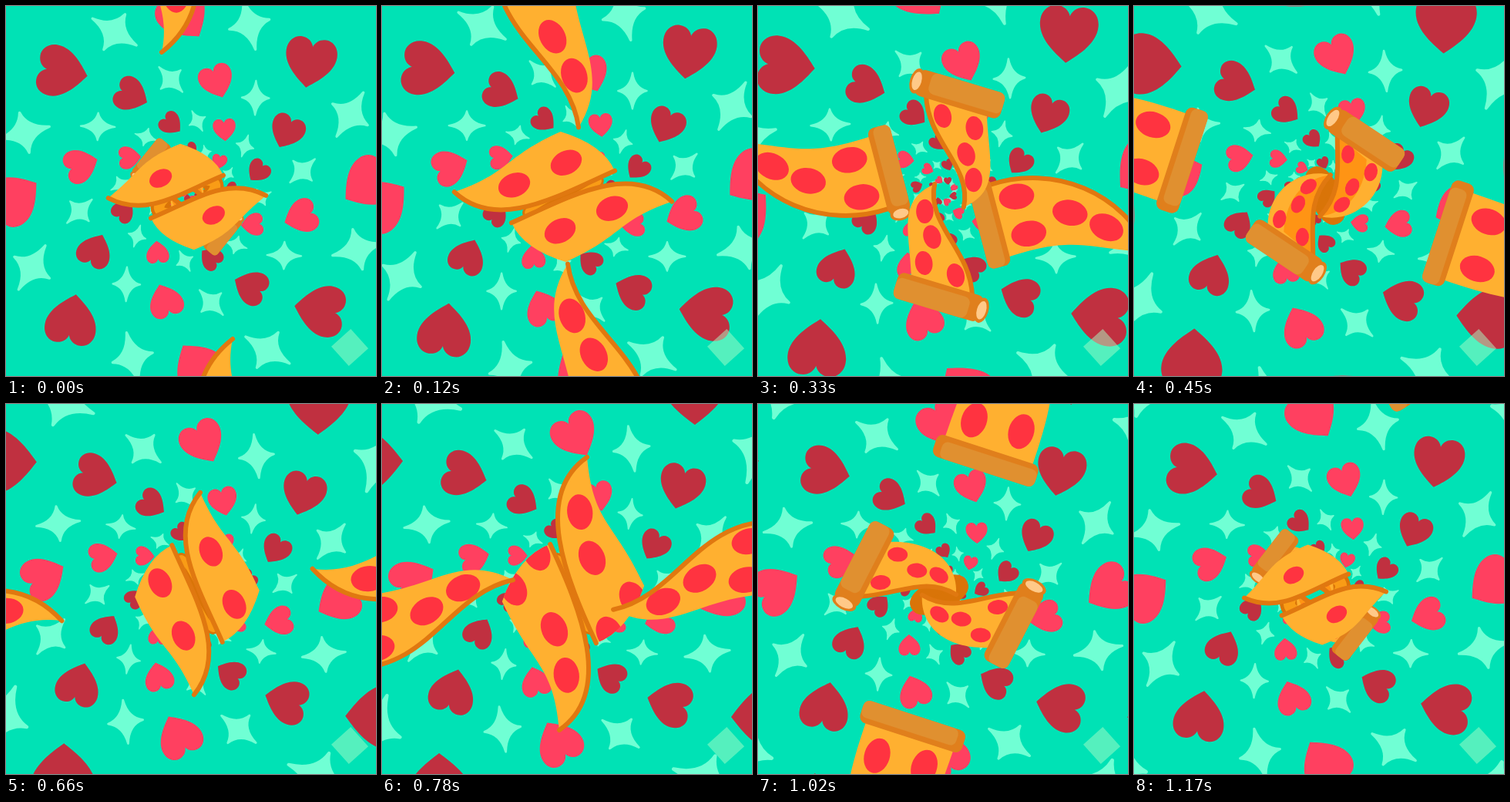
Animation of 480 by 480 pixels, one loop 1200 ms. Source, as an HTML page with a canvas:

```html
<!DOCTYPE html>
<html lang="en">
<head>
<meta charset="utf-8">
<title>Pizza love</title>
<style>
  html, body { margin: 0; width: 100%; height: 100%; overflow: hidden; background: #00e2b5; }
  canvas { display: block; width: 480px; height: 480px; }
</style>
</head>
<body>
<canvas id="stage" width="480" height="480"></canvas>
<script>
const ctx = document.getElementById('stage').getContext('2d');
const LOOP = 1200, STEP = 30, RAD = Math.PI / 180;
const BG = '#00e2b5', CHEESE = '#ffb030', SHADE = '#ff9414', MEAT = '#ff3340';
const EDGE = '#e07810', ROLL = '#d97408', CRUST = '#e09030', CRUST_DARK = '#e07f1c';

const lerp = (a, b, f) => a + (b - a) * f;
const clamp = f => Math.min(1, Math.max(0, f));
const polar = (deg, r) => [r * Math.cos(deg * RAD), r * Math.sin(deg * RAD)];

function fillOval(x, y, rx, ry, turn, color) {
  ctx.fillStyle = color;
  ctx.beginPath();
  ctx.ellipse(x, y, rx, ry, turn, 0, 7);
  ctx.fill();
}

// ---- spiral of hearts and sparkles ----
const heart = new Path2D(
  'M0 .52C-.14 .41-.5 .17-.5-.15C-.5-.34-.37-.45-.24-.45C-.12-.45-.03-.38 0-.28' +
  'C.03-.38.12-.45.24-.45C.37-.45.5-.34.5-.15C.5.17.14.41 0 .52Z');
const spark = new Path2D(
  'M0-.5Q.06-.09.4 0Q.08.08 0 .5Q-.07.08-.4 0Q-.07-.07 0-.5Z');

// each ring moves straight on to the next one during a loop
const ringRadius = k => 174.5 * 1.47 ** (k - 4) - 27.5;
const ringSize = k => 44.5 * 1.5 ** (k - 4);

function stamp(path, deg, r, size, color, outline) {
  const [x, y] = polar(deg, r);
  ctx.save();
  ctx.translate(240 + x, 240 + y);
  ctx.rotate((deg + 57) * RAD);
  ctx.scale(size, size);
  ctx.fillStyle = ctx.strokeStyle = color;
  ctx.fill(path);
  if (outline) {
    ctx.lineWidth = 0.05;
    ctx.lineJoin = 'round';
    ctx.stroke(path);
  }
  ctx.restore();
}

function drawSpiral(f) {
  for (let k = 0; k < 6; k++) {
    const r = lerp(ringRadius(k), ringRadius(k + 1), f);
    const size = lerp(ringSize(k), ringSize(k + 1), f);
    for (let j = 0; j < 8; j++) {
      const deg = -77 + j * 45 - 15.4 * (k - 4 + f);
      stamp(spark, deg + 21.7, r, size, '#70ffd4', true);
      stamp(heart, deg, r, size, j % 2 ? '#c03040' : '#ff4060');
    }
  }
}

// ---- pizza poses by time ----
// base x, y, tilt, width, heading at base, tip x, y, heading at tip
const ENTER = {
  0:   [-70, -450, 0, 115, 90, -46, -186, 122],
  225: [-32, -198, 1, 86, 91, 38, -17, 96],
  420: [41, -70, 31, 76, 88, -5, 25, 160],
  600: [42, -35, 40, 30, 110, 0, 20, 160]
};
const EXIT = {
  540:  [46, 17, -54, 65, -112, -4, -92, -100],
  780:  [61, 27, -50, 97, -115, 18, -177, -65],
  870:  [31, -50, -23, 93, -115, 59, -246, -54],
  1020: [51, -184, 18, 119, -71, 125, -390, -66]
};

// smooth curve through uneven keys, straight on beyond the ends
function pose(keyed, p) {
  const keys = Object.keys(keyed).map(Number), last = keys.length - 1;
  let i = 0;
  while (i < last - 1 && p >= keys[i + 1]) i++;
  const span = keys[i + 1] - keys[i], raw = (p - keys[i]) / span;
  const f = clamp(raw), f2 = f * f, f3 = f2 * f;
  const slope = (k, n) => {
    const a = keys[Math.max(k - 1, 0)], b = keys[Math.min(k + 1, last)];
    return (keyed[b][n] - keyed[a][n]) / (b - a) * span;
  };
  return keyed[keys[i]].map((v, n) => {
    const w = keyed[keys[i + 1]][n], m0 = slope(i, n), m1 = slope(i + 1, n);
    return v * (2 * f3 - 3 * f2 + 1) + m0 * (f3 - 2 * f2 + f) +
           w * (3 * f2 - 2 * f3) + m1 * (f3 - f2) + (raw - f) * (raw < 0 ? m0 : m1);
  });
}

// both long edges of a slice as cubic curves from crust to tip
function buildSlice([bx, by, tilt, width, head, tx, ty, tipHead], side) {
  const length = Math.hypot(tx - bx, ty - by);
  const [hx, hy] = polar(head, length * .45);
  const [ex, ey] = polar(tipHead, length * .36);
  const [ox, oy] = polar(tilt, width / 2);
  const [nx, ny] = polar(tipHead + 90 * side, width * (side > 0 ? .45 : .3));
  const edge = s => {
    const x = bx + s * ox, y = by + s * oy;
    return [[x, y], [x + hx, y + hy], [tx - ex + s * nx, ty - ey + s * ny], [tx, ty]];
  };
  const [kx, ky] = polar(head, width * .25);
  return { left: edge(-1), right: edge(1), heel: [bx - kx, by - ky], width, length, tilt, side };
}

function along(edge, u) {
  const w = 1 - u;
  return [0, 1].map(n => w * w * w * edge[0][n] + 3 * w * w * u * edge[1][n] +
    3 * w * u * u * edge[2][n] + u * u * u * edge[3][n]);
}

// u runs from crust to tip, v from left to right
function spot(s, u, v) {
  const a = along(s.left, u), b = along(s.right, u);
  return [lerp(a[0], b[0], v), lerp(a[1], b[1], v)];
}

function drawCrust(s, showEnd) {
  const k = Math.min(1, s.width / 62), entering = s.side < 0;
  const m = (entering ? 17 : 10) * k, th = (entering ? 32 : 27) * k;
  ctx.save();
  ctx.translate(...s.left[0]);
  ctx.rotate(s.tilt * RAD);
  ctx.scale(1, s.side);
  ctx.fillStyle = CRUST_DARK;
  ctx.beginPath();
  ctx.roundRect(-m, -3, s.width + 2 * m, th + 3, 9 * k);
  ctx.fill();
  ctx.fillStyle = CRUST;
  ctx.beginPath();
  ctx.roundRect(0, 4 * k, s.width + m, th - 4 * k, 8 * k);
  ctx.fill();
  if (showEnd) {
    fillOval(-m, th / 2 - 1, 9 * k, th * .52, 0, CRUST_DARK);
    fillOval(-m, th / 2 - 1, 6 * k, th * .38, 0, '#ffc988');
  }
  ctx.restore();
}

const TOPPINGS = [[.12, .24], [.14, .77], [.42, .48], [.68, .53]];

// roll: share of the slice still curled away behind its base
function drawSlice(s, { line, shaded, roll, crust, crustEnd }) {
  const [l0, l1, l2, tip] = s.left, [r0, r1, r2] = s.right;
  const body = new Path2D();
  body.moveTo(...l0);
  body.bezierCurveTo(...l1, ...l2, ...tip);
  body.bezierCurveTo(...r2, ...r1, ...r0);
  body.quadraticCurveTo(...s.heel, ...l0);
  ctx.fillStyle = CHEESE;
  ctx.fill(body);

  ctx.save();
  ctx.clip(body);
  if (shaded) {
    ctx.fillStyle = SHADE;
    ctx.beginPath();
    for (let u = 0; u <= 1; u += .05) ctx.lineTo(...spot(s, u, 0));
    for (let u = 1; u >= 0; u -= .05) ctx.lineTo(...spot(s, u, .65));
    ctx.fill();
  }
  const size = Math.min(23, s.length / 8.5);
  for (const [u, v] of TOPPINGS) {
    const seen = (u - roll) / (1 - roll);
    if (seen < -.05) continue;
    const [x, y] = spot(s, seen, v), [x2, y2] = spot(s, seen + .05, v);
    fillOval(x, y, size, size * .72, Math.atan2(y2 - y, x2 - x), MEAT);
  }
  ctx.restore();

  if (line) {
    const [a, b, c, d] = s[line];
    ctx.strokeStyle = EDGE;
    ctx.lineWidth = 6;
    ctx.lineCap = 'round';
    ctx.beginPath();
    ctx.moveTo(...a);
    ctx.bezierCurveTo(...b, ...c, ...d);
    ctx.stroke();
  }
  if (crust) drawCrust(s, crustEnd);
}

// rolled cheese seen between the two slices
function drawRoll(p) {
  const f = clamp((p - 540) / 120), early = p < 500;
  const rx = early ? 28 : lerp(36, 50, f), ry = early ? 8 : lerp(18, 7, f);
  for (const [w, color] of [[24, ROLL], [15, early ? ROLL : '#f99c16']]) {
    ctx.strokeStyle = color;
    ctx.lineWidth = w * lerp(1, .6, f);
    ctx.beginPath();
    ctx.ellipse(0, 0, rx, ry, 65 * RAD, 0, 7);
    ctx.stroke();
  }
}

function drawPair(cx, cy, deg, p) {
  const twice = draw => {
    for (const turn of [0, 180]) {
      ctx.save();
      ctx.translate(cx, cy);
      ctx.rotate((deg + turn) * RAD);
      draw();
      ctx.restore();
    }
  };
  if (p > 380 && p < 800) twice(() => drawRoll(p));
  if (p < 600) {
    const s = buildSlice(pose(ENTER, p), -1);
    const look = { line: p < 120 ? 'right' : 'left', shaded: p > 420, roll: 0, crust: true, crustEnd: true };
    twice(() => drawSlice(s, look));
  }
  if (p >= 480) {
    const s = buildSlice(pose(EXIT, p), 1);
    const near = p < 950;
    const look = { line: near && 'left', roll: .5 * Math.sqrt(clamp((800 - p) / 260)), crust: p > 820, crustEnd: near };
    twice(() => drawSlice(s, look));
  }
}

function drawBadge() {
  ctx.save();
  ctx.translate(446, 443);
  ctx.rotate(-42 * RAD);
  ctx.fillStyle = 'rgba(170,255,200,.5)';
  ctx.fillRect(-17, -17, 34, 34);
  ctx.restore();
}

function draw(t) {
  ctx.fillStyle = BG;
  ctx.fillRect(0, 0, 480, 480);
  drawSpiral(t / LOOP);
  const pairs = [
    [248, 246, 0, t],
    [235, 247.5, -90, (t + LOOP - 630) % LOOP]
  ];
  // the pair flying in stays in front
  pairs.sort((a, b) => b[3] - a[3]).forEach(a => drawPair(...a));
  drawBadge();
}

const start = performance.now();
function tick() {
  const t = (performance.now() - start) % LOOP;
  draw(Math.floor(t / STEP) * STEP);
  requestAnimationFrame(tick);
}
tick();
</script>
</body>
</html>
```
